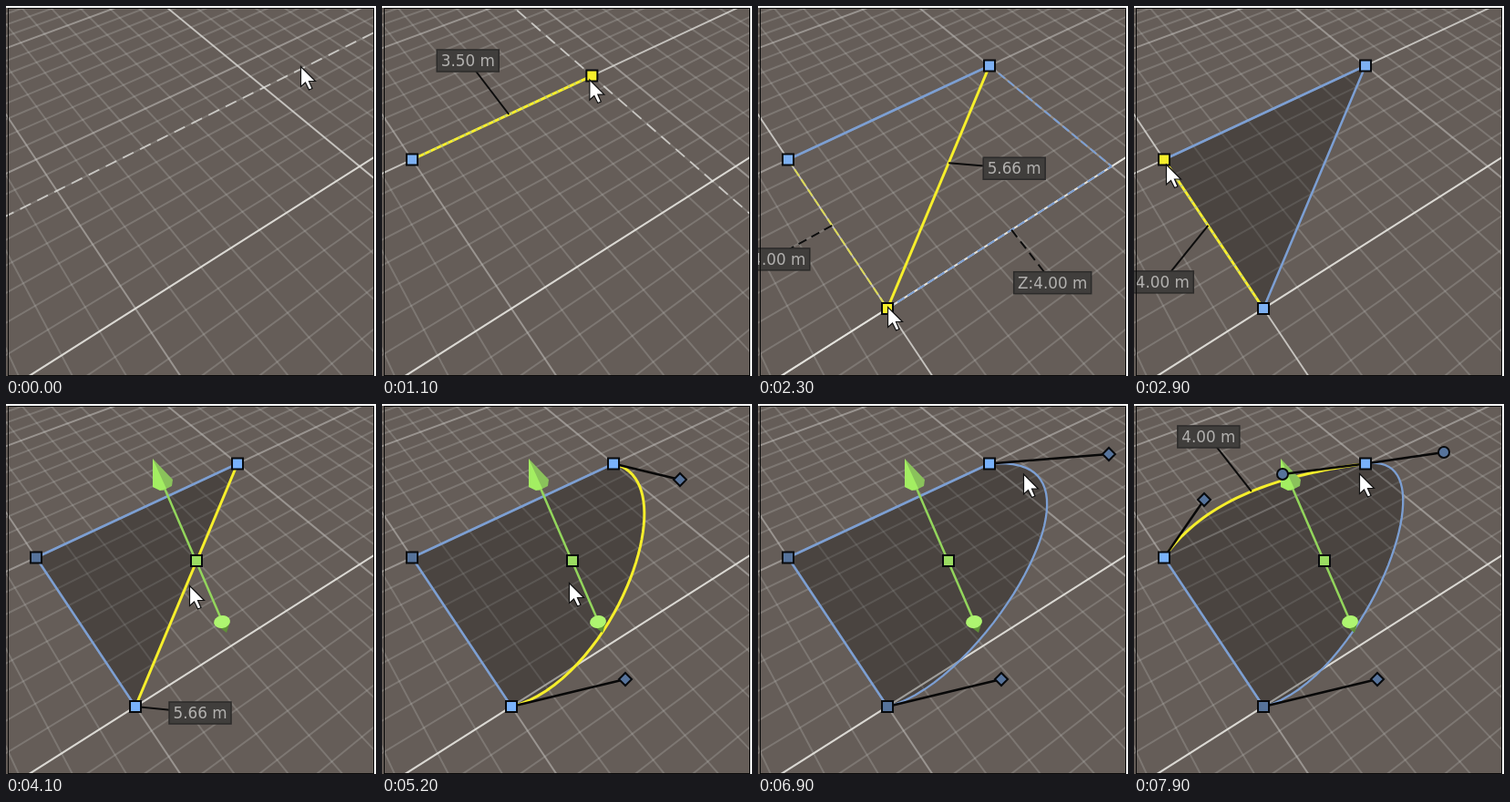
These frames come from a looping animation (406x406 px, 8 s). An HTML page with a canvas:

```html
<!DOCTYPE html>
<html lang="en">
<head>
<meta charset="utf-8">
<title>Shape drawing on a grid</title>
<style>
  html, body { margin: 0; width: 100%; height: 100%; overflow: hidden; background: #fff; }
  canvas { display: block; width: 406px; height: 406px; }
</style>
</head>
<body>
<canvas id="stage" width="406" height="406"></canvas>
<script>
const ctx = document.getElementById('stage').getContext('2d');
const LOOP = 8000, STEP = 100;
const YELLOW = '#f6ef2b', BLUE = '#7c9fd3', LIGHT = '#7db0f2', DIM = '#56739b', LIME = '#a3ee62';

// Ground plane: one unit is 4 m, A is the origin, s runs to B and t runs to C.
const A = [0, 0], B = [1, 0], C = [0, 1];
const M = { a: 269.3, b: 79.9, c: 33, d: -90.55, e: 95.4, f: 168.5, g: 0.19, h: -0.2051 };

function project([s, t]) {
  const w = M.g * s + M.h * t + 1;
  return [(M.a * s + M.b * t + M.c) / w, (M.d * s + M.e * t + M.f) / w];
}

function unproject([x, y]) {
  const p = M.a - M.g * x, q = M.b - M.h * x, r = M.d - M.g * y, u = M.e - M.h * y;
  const det = p * u - q * r, dx = x - M.c, dy = y - M.f;
  return [(dx * u - q * dy) / det, (p * dy - r * dx) / det];
}

const mix = (p, q, k) => p.map((v, i) => v + (q[i] - v) * k);

// Keys are [time, x, y]; the value holds outside the range.
function track(keys, time) {
  const next = keys.findIndex(k => k[0] > time);
  if (next === 0) return keys[0].slice(1);
  if (next < 0) return keys[keys.length - 1].slice(1);
  const from = keys[next - 1], to = keys[next];
  return mix(from.slice(1), to.slice(1), (time - from[0]) / (to[0] - from[0]));
}

const drawPath = [
  [0, 1, 0.25], [400, 0, 0], [600, 0, 0], [900, 0.56, 0], [1100, 0.875, 0], [1500, 1, 0],
  [1600, 1, 0], [1900, 0.8, 0.5], [2300, 0, 1], [2500, 0, 1], [2900, 0, 0]
];
const editCursor = [
  [3100, 35, 174], [3700, 201, 199], [4200, 201, 199], [4500, 216, 166], [4800, 205, 196],
  [5300, 205, 196], [5500, 246, 238], [5800, 367, 104], [6000, 343, 72], [6200, 321, 84],
  [6300, 321, 84], [6600, 377, 58], [6800, 377, 58], [7000, 205, 95], [7100, 205, 95],
  [7200, 211, 104], [7500, 211, 104], [7900, 247, 76]
];
const tangentPath = [[6300, 327, 83], [6600, 385, 55]];

function trace(points, closed) {
  ctx.beginPath();
  points.forEach(p => ctx.lineTo(...p));
  if (closed) ctx.closePath();
}

function stroke(points, color, width, dash = []) {
  trace(points);
  ctx.strokeStyle = color;
  ctx.lineWidth = width;
  ctx.setLineDash(dash);
  ctx.stroke();
  ctx.setLineDash([]);
}

function fill(points, color) {
  trace(points, true);
  ctx.fillStyle = color;
  ctx.fill();
}

const groundLine = (p, q, ...style) => stroke([project(p), project(q)], ...style);
const lineS = (s, ...style) => groundLine([s, -4], [s, 3], ...style);
const lineT = (t, ...style) => groundLine([-1, t], [4, t], ...style);

function drawGrid() {
  ctx.fillStyle = '#655d58';
  ctx.fillRect(0, 2, 404, 404);
  const style = i => i % 8 ? ['rgba(190,188,185,.27)', 2] : ['rgba(205,203,200,.5)', 2];
  for (let i = -8; i <= 32; i++) lineS(i / 8, ...style(i));
  for (let i = -32; i <= 24; i++) lineT(i / 8, ...style(i));
  lineT(1, 'rgba(235,234,228,.8)', 2);
}

function drawGuides([s, t]) {
  const style = v => Number.isInteger(v)
    ? ['rgba(235,235,230,.55)', 1.6] : ['rgba(232,232,228,.7)', 1.8, [13, 8]];
  lineS(s, ...style(s));
  lineT(t, ...style(t));
}

function knob([x, y], color, shape = 'square') {
  ctx.beginPath();
  if (shape === 'circle') ctx.arc(x, y, 6, 0, 7);
  else if (shape === 'diamond') {
    [[0, -7], [7, 0], [0, 7], [-7, 0]].forEach(([dx, dy]) => ctx.lineTo(x + dx, y + dy));
    ctx.closePath();
  } else ctx.rect(x - 6, y - 6, 12, 12);
  ctx.fillStyle = color;
  ctx.fill();
  ctx.strokeStyle = '#080a0d';
  ctx.lineWidth = 2;
  ctx.stroke();
}

const corner = (p, color) => knob(project(p), color);

function label(text, anchor, dx, dy, dash) {
  const x = anchor[0] + dx, y = anchor[1] + dy;
  stroke([anchor, [x, y]], '#0c0c0c', 2, dash);
  ctx.font = '16.8px "DejaVu Sans", sans-serif';
  ctx.textAlign = 'center';
  ctx.textBaseline = 'alphabetic';
  const w = Math.round(ctx.measureText(text).width) + 9;
  ctx.fillStyle = '#403e3c';
  ctx.fillRect(x - w / 2, y - 12, w, 24);
  ctx.strokeStyle = '#2c2b2a';
  ctx.lineWidth = 1.5;
  ctx.strokeRect(x - w / 2, y - 12, w, 24);
  ctx.fillStyle = '#b2b1af';
  ctx.fillText(text, x, y + 6);
}

const meters = v => (4 * Math.abs(v)).toFixed(2) + ' m';

function activeEdge(p, q) {
  groundLine(p, q, YELLOW, 3);
  if (p[0] === q[0] || p[1] === q[1]) groundLine(p, q, 'rgba(150,180,200,.75)', 1.6, [2, 5]);
}

function drawCursor([x, y]) {
  const outline = [[0, 0], [0, 22], [5, 17.5], [9, 25.5], [12.5, 24], [9, 16], [16, 16]];
  trace(outline.map(([dx, dy]) => [x + dx + 0.5, y + dy + 0.5]), true);
  ctx.fillStyle = '#fff';
  ctx.fill();
  ctx.strokeStyle = '#111';
  ctx.lineWidth = 1.2;
  ctx.stroke();
}

// Cubic on the ground plane; h1 and h2 are tangent ends on screen.
function edgePoints(p, q, h1, h2) {
  if (!h1) return [project(p), project(q)];
  const c1 = unproject(h1), c2 = unproject(h2);
  return Array.from({ length: 41 }, (_, i) => {
    const k = i / 40, m = 1 - k;
    return project([0, 1].map(n =>
      m * m * m * p[n] + 3 * m * m * k * c1[n] + 3 * m * k * k * c2[n] + k * k * k * q[n]));
  });
}

function drawGizmo() {
  stroke([[172, 88], [237, 238]], '#93d65c', 2.5);
  fill([[161, 60], [183, 83], [182, 90], [172, 95], [161, 91]], '#8ac25b');
  fill([[161, 60], [176, 93], [169, 95], [161, 91]], LIME);
  fill([[230, 242], [242, 251], [246, 238]], '#5f9138');
  ctx.beginPath();
  ctx.ellipse(237, 239, 9, 7, -0.2, 0, 7);
  ctx.fillStyle = '#aef570';
  ctx.fill();
  knob([209, 172], '#9bdc62');
}

function drawingPhase(time) {
  const P = track(drawPath, time).map(v => Math.round(v * 16) / 16);
  drawGuides(P);
  if (time >= 2600) {
    const closing = time >= 2900;
    if (closing) fill([A, B, C].map(project), 'rgba(0,0,0,.27)');
    groundLine(A, B, BLUE, 2.5);
    groundLine(B, C, BLUE, 2.5);
    activeEdge(C, P);
    label(meters(1 - P[1]), project(mix(C, P, 0.5)), -50, 62);
    if (!closing) corner(A, LIGHT);
    corner(B, LIGHT);
    corner(C, LIGHT);
    corner(P, YELLOW);
  } else if (time >= 1700) {
    const [s, t] = P, near = [s, 0], far = [1, t];
    groundLine(A, B, BLUE, 2.5);
    groundLine(near, P, 'rgba(225,222,70,.85)', 2, [9, 4]);
    groundLine(B, far, BLUE, 2, [9, 4]);
    groundLine(P, far, BLUE, 2, [9, 4]);
    activeEdge(B, P);
    label('X:' + meters(t), project(mix(near, P, 0.5)), -67, 37, [10, 6]);
    label('Z:' + meters(1 - s), project(mix(P, far, 0.5)), 45, 58, [10, 6]);
    label(meters(Math.hypot(1 - s, t)), project(mix(B, P, 0.5)), 72, 6);
    corner(A, LIGHT);
    corner(B, LIGHT);
    corner(P, YELLOW);
  } else if (time >= 700) {
    activeEdge(A, P);
    label(meters(P[0]), project(mix(A, P, 0.5)), -45, -59);
    corner(A, LIGHT);
    corner(P, YELLOW);
  }
  const [x, y] = project(P);
  const offset = time >= 2900 ? [2, 5] : time >= 1700 ? [0, -2] : [-3, 4];
  drawCursor(time < 400 ? mix([323, 66], [30, 172], time / 400) : [x + offset[0], y + offset[1]]);
}

function editingPhase(time) {
  const bent = time >= 5200, smooth = time >= 7400;
  const picked = time >= 4100, pickedBC = time >= 3700 && time < 6400, pickedAB = time >= 7000;
  const out = smooth ? [340, 53] : track(tangentPath, time);
  const end = [267, 302], start = [77, 105], into = [163, 77];
  const ab = smooth ? edgePoints(A, B, start, into) : edgePoints(A, B);
  const bc = bent ? edgePoints(B, C, out, end) : edgePoints(B, C);

  fill([...ab, ...bc], 'rgba(0,0,0,.27)');
  groundLine(C, A, BLUE, 2.5);
  stroke(ab, pickedAB ? YELLOW : BLUE, pickedAB ? 3 : 2.5);
  stroke(bc, pickedBC ? YELLOW : BLUE, pickedBC && picked ? 3 : 2.3);
  if (picked) drawGizmo();

  const tangent = (p, tip, shape) => {
    stroke([project(p), tip], '#080808', 2.5);
    knob(tip, DIM, shape);
  };
  if (bent) {
    tangent(B, out, smooth ? 'circle' : 'diamond');
    tangent(C, end, 'diamond');
  }
  if (smooth) {
    tangent(A, start, 'diamond');
    tangent(B, into, 'circle');
  }
  if (pickedBC && !bent) label('5.66 m', project(C), 71, 7);
  if (pickedAB && !smooth) label('4.00 m', project(A), -46, -59);
  if (time >= 7600) label('4.00 m', ab[20], -47, -60);

  const bright = '#79b2fb';
  corner(A, smooth ? bright : DIM);
  corner(B, picked ? bright : DIM);
  corner(C, picked && time < 6400 ? bright : DIM);
  drawCursor(track(editCursor, time));
}

function drawFrame() {
  ctx.fillStyle = '#fff';
  ctx.fillRect(0, 0, 406, 406);
  ctx.save();
  ctx.beginPath();
  ctx.rect(0, 2, 404, 404);
  ctx.clip();
  const time = Math.floor(performance.now() % LOOP / STEP) * STEP;
  drawGrid();
  if (time < 3200) drawingPhase(time);
  else editingPhase(time);
  ctx.restore();
  ctx.strokeStyle = '#0a0a0a';
  ctx.lineWidth = 1;
  ctx.strokeRect(2.5, 2.5, 401, 403);
  requestAnimationFrame(drawFrame);
}
requestAnimationFrame(drawFrame);
</script>
</body>
</html>
```
